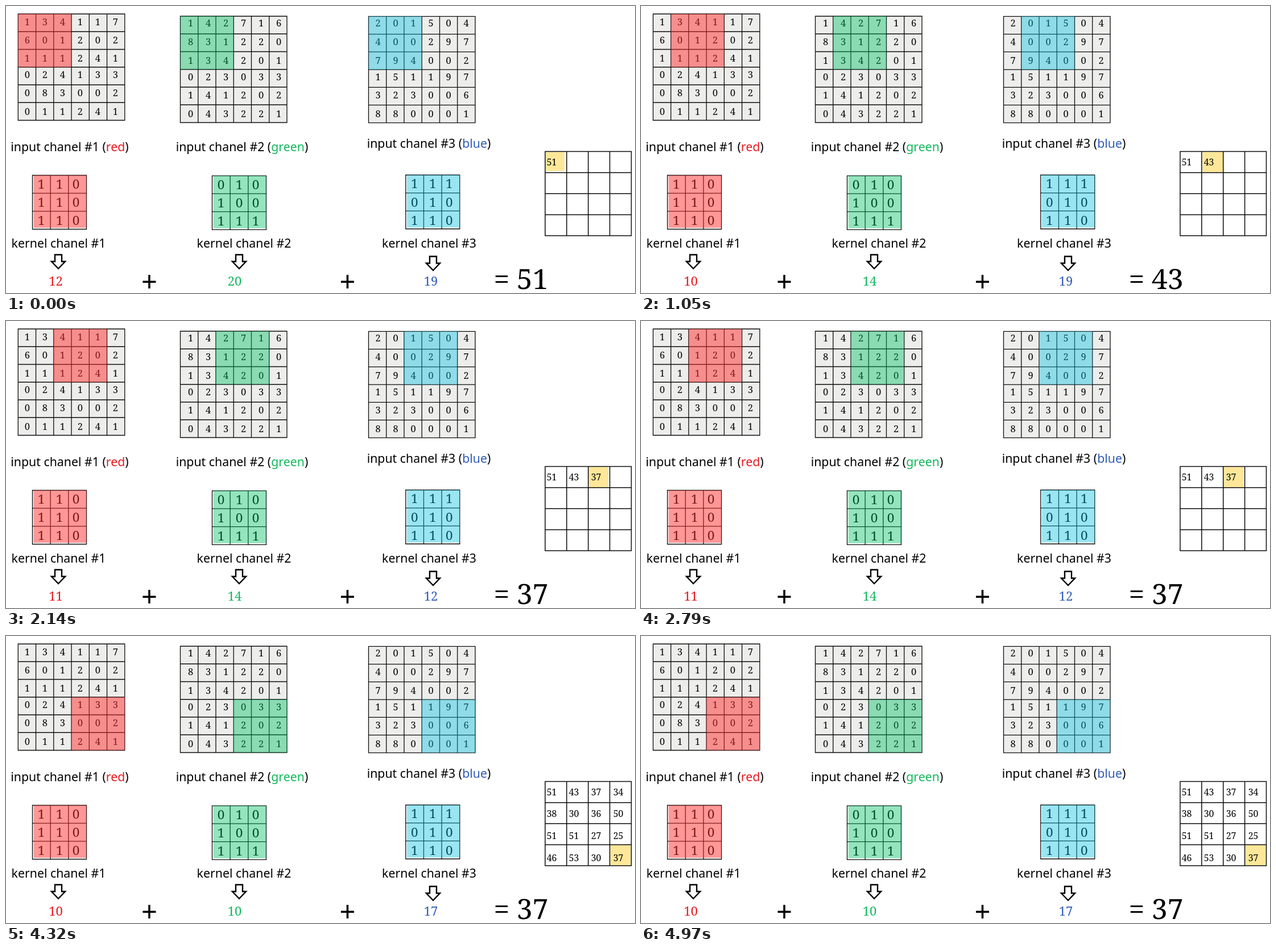
Recreate the animation shown at these times as an HTML page. Size 1106 px wide and 506 px high, loop 5410 ms.

```html
<!DOCTYPE html>
<html lang="en">
<head>
<meta charset="utf-8">
<title>Convolution over three channels</title>
<style>
  html, body { margin: 0; width: 100%; height: 100%; overflow: hidden; background: #fff; }
  svg { display: block; width: 100%; height: 100%; }
  text { font-family: "Noto Serif", serif; fill: #000; text-anchor: middle; }
  .label { font-family: "Noto Sans", sans-serif; font-size: 21.3px; }
  .cell { font-size: 16.5px; }
  .weight { font-size: 22.5px; }
  .out { font-size: 16px; }
  .sum { font-size: 22px; }
  .total { font-size: 50px; }
  .plus { font-family: "Noto Sans", sans-serif; font-size: 49px; }
</style>
</head>
<body>
<svg id="stage" viewBox="0 0 1106 506"></svg>
<script>
const stage = document.getElementById('stage');

function add(tag, attrs, content = '') {
  const el = document.createElementNS('http://www.w3.org/2000/svg', tag);
  for (const key in attrs) el.setAttribute(key, attrs[key]);
  el.textContent = content;
  stage.append(el);
  return el;
}

const text = (cls, x, y, content, style = '') => add('text', { class: cls, x, y, style }, content);
const rect = (x, y, width, height, fill, opacity = 1) =>
  add('rect', { x, y, width, height, fill, 'fill-opacity': opacity });

function lines(x, y, n, w, h, weight) {
  let d = '';
  for (let i = 0; i <= n; i++) {
    d += `M${x + i * w / n} ${y}v${h}M${x} ${y + i * h / n}h${w}`;
  }
  add('path', { d, stroke: '#0c0c0c', 'stroke-width': weight, 'stroke-linecap': 'square', fill: 'none' });
}

const CELL = 31.25, KERNEL = 95;
const lowRows = [36, 68.5, 101.5, 130.5, 162.5, 195.5];
const channels = [
  { name: 'red', ink: '#e7191f', tint: '#ff3131', alpha: 0.5,
    x: 21.3, y: 14, textX: 37.4, rows: [34, 65.5, 98, 127.2, 159, 191.5],
    data: ['134117', '601202', '111241', '024133', '083002', '011241'],
    label: [112, 256], kx: 46.5, ky: 298.5, kernel: ['110', '110', '110'],
    klabel: 92.5, arrow: [92, 438.5], sumX: 75.3 },
  { name: 'green', ink: '#12b85c', tint: '#00bf63', alpha: 0.42,
    x: 306.5, y: 18, textX: 324.5, rows: lowRows,
    data: ['142716', '831220', '134201', '023033', '141202', '043221'],
    label: [415, 256], kx: 362.5, ky: 299.3, kernel: ['010', '100', '111'],
    klabel: 418.5, arrow: [410, 438.5], sumX: 389.7 },
  { name: 'blue', ink: '#2f5bb7', tint: '#0cc0df', alpha: 0.42,
    x: 637.5, y: 18.3, textX: 654, rows: lowRows,
    data: ['201504', '400297', '794002', '151197', '323006', '880001'],
    label: [743.5, 250], kx: 702.8, ky: 298, kernel: ['111', '010', '110'],
    klabel: 744, arrow: [751, 441.5], sumX: 734.7 }
];

channels.forEach((ch, i) => {
  const size = CELL * 6;
  rect(ch.x, ch.y, size, size, '#ededec');
  lines(ch.x, ch.y, 6, size, size, 1.3);
  ch.data.forEach((row, r) => [...row].forEach((v, c) =>
    text('cell', ch.textX + c * 31, ch.rows[r], v)));
  ch.view = rect(ch.x, ch.y, CELL * 3, CELL * 3, ch.tint, ch.alpha);

  const label = text('label', ...ch.label, `input chanel #${i + 1} (`);
  const word = add('tspan', { style: `fill:${ch.ink}` }, ch.name);
  label.append(word, ')');

  lines(ch.kx, ch.ky, 3, KERNEL, KERNEL, 1.3);
  ch.kernel.forEach((row, r) => [...row].forEach((v, c) =>
    text('weight', ch.kx + [15.5, 47.5, 76.5][c], ch.ky + 23.2 + r * 32.3, v)));
  rect(ch.kx + 2, ch.ky, KERNEL - 2, KERNEL - 2.5, ch.tint, ch.alpha);
  text('label', ch.klabel, 426, `kernel chanel #${i + 1}`);

  const [ax, ay] = ch.arrow;
  add('path', { d: `M${ax - 6} ${ay}h12v12h6l-12 12.5l-12 -12.5h6z`,
    fill: '#fff', stroke: '#000', 'stroke-width': 2.4 });
  ch.sum = text('sum', ch.sumX, 493, '', `text-anchor:start;fill:${ch.ink}`);
});

text('plus', 252, 502.5, '+');
text('plus', 600.5, 502.5, '+');
text('total', 871.5, 499, '=');
const total = text('total', 925.7, 499, '');

const mark = rect(0, 0, 0, 0, '#fee798');
lines(948, 256.5, 4, 151.5, 148.6, 1.5);
const outCells = Array.from({ length: 16 }, (_, n) =>
  text('out', 959.6 + n % 4 * 39, [281, 319, 358, 397.3][n >> 2], ''));

// Sum of one kernel laid over its channel with the corner at (r, c)
function convolve({ data, kernel }, r, c) {
  let sum = 0;
  for (let i = 0; i < 3; i++)
    for (let j = 0; j < 3; j++) sum += data[r + i][c + j] * kernel[i][j];
  return sum;
}

const sumAt = n => channels.reduce((s, ch) => s + convolve(ch, n >> 2, n % 4), 0);
const totals = outCells.map((_, n) => sumAt(n));

// Output cell reached, and the box of its highlight
const steps = [
  { cell: 0, box: [949, 257.5, 33, 33.5] },
  { cell: 1, box: [987.5, 257.5, 35.5, 35.5] },
  { cell: 2, box: [1024.5, 257.5, 34.5, 36] },
  { cell: 3, box: [1062.5, 257.5, 36, 35.5] },
  { cell: 15, box: [1062.5, 368.5, 36, 36] }
];
const FIRST = 1050, STEP = 1090, LOOP = 5410;
let shown = -1;

function render(ms) {
  const t = ms % LOOP;
  const k = t < FIRST ? 0 : 1 + Math.floor((t - FIRST) / STEP);
  if (k === shown) return;
  shown = k;
  const { cell, box } = steps[k];
  const r = cell >> 2, c = cell % 4;
  for (const ch of channels) {
    ch.view.setAttribute('x', ch.x + c * CELL);
    ch.view.setAttribute('y', ch.y + r * CELL);
    ch.sum.textContent = convolve(ch, r, c);
  }
  total.textContent = totals[cell];
  ['x', 'y', 'width', 'height'].forEach((key, i) => mark.setAttribute(key, box[i]));
  outCells.forEach((el, n) => { el.textContent = n <= cell ? totals[n] : ''; });
}

const start = performance.now();
function frame() {
  render(performance.now() - start);
  requestAnimationFrame(frame);
}
frame();
</script>
</body>
</html>
```
